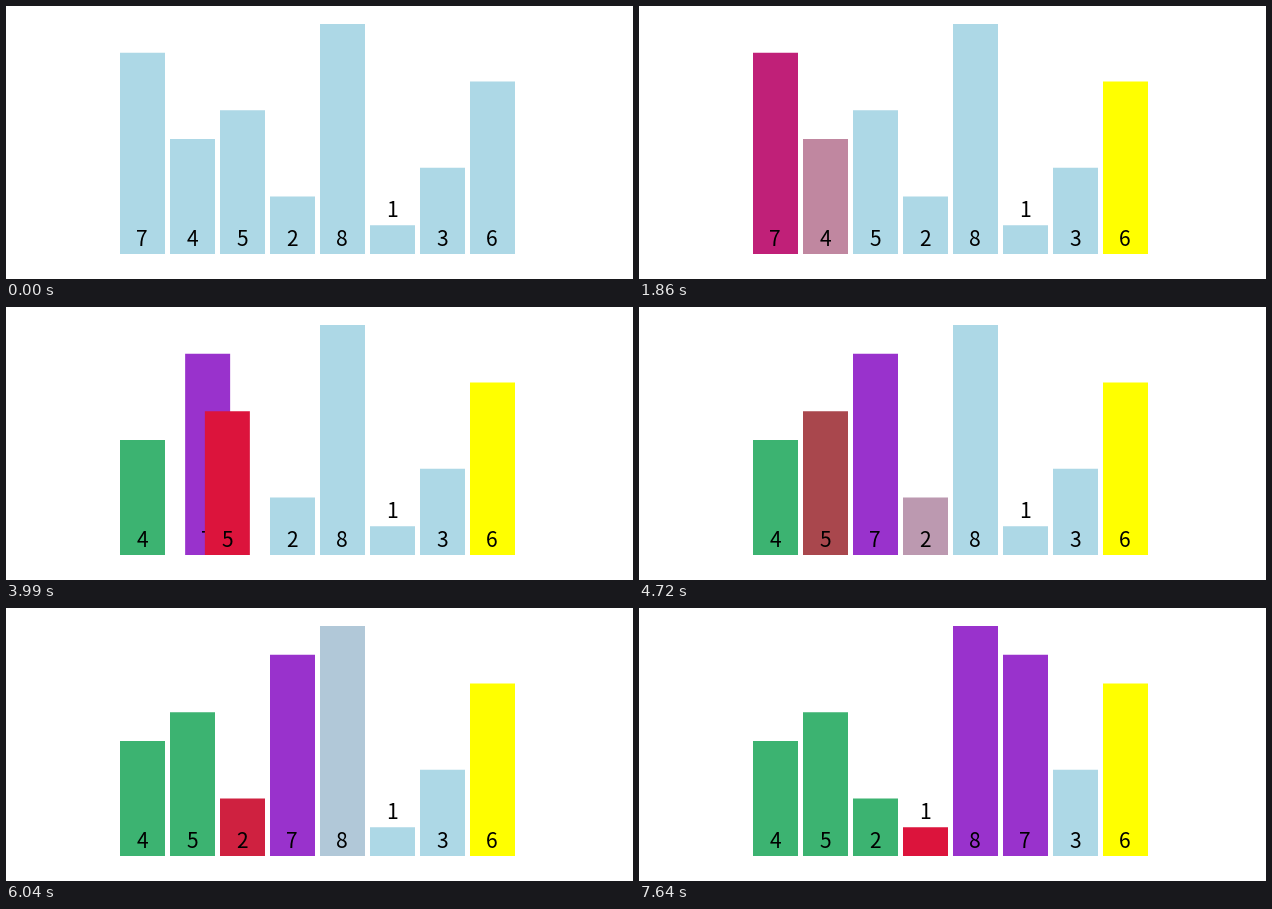
These frames come from a looping animation (627x273 px, 8000 ms). A matplotlib script:

```python
import matplotlib.pyplot as plt
from matplotlib.animation import FuncAnimation
from matplotlib.colors import to_rgb
from matplotlib.patches import Rectangle
import numpy as np

W, H, DPI = 627, 273, 64
LOOP, TICK = 8000, 20
LEFT, PITCH, BAR_W, BASE, UNIT = 114, 50, 45, 248, 28.75
VALUES = [7, 4, 5, 2, 8, 1, 3, 6]

# Each step of the sort starts at one of these moments and eases for FADE ms
STARTS = [420, 1110, 1738, 2445, 3148, 3870, 4608, 5280, 5969, 6691, 7330]
FADE = 260

IDLE, PIVOT, ACTIVE, LESS, MORE = (
    np.array(to_rgb(c))
    for c in ("lightblue", "yellow", "crimson", "mediumseagreen", "darkorchid")
)


def partition(values):
    """Yield (slots, colours) after each step of a quicksort partition."""
    order = list(values)
    colour = {v: IDLE for v in order}
    pivot, store = order[-1], 0

    def snap():
        return {v: i for i, v in enumerate(order)}, dict(colour)

    yield snap()
    colour[pivot] = PIVOT
    yield snap()
    for i in range(len(order) - 1):
        v = order[i]
        colour[v] = ACTIVE
        yield snap()
        if v < pivot:
            if store != i:
                order[store], order[i] = order[i], order[store]
                yield snap()
            store += 1
        colour[v] = LESS if v < pivot else MORE


def ease(t):
    t = min(max(t, 0), 1)
    return 4 * t**3 if t < 0.5 else 1 - 4 * (1 - t) ** 3


def mix(a, b, p):
    return a + (b - a) * p


STATES = list(partition(VALUES))

fig = plt.figure(figsize=(W / DPI, H / DPI), dpi=DPI, facecolor="white")
ax = fig.add_axes([0, 0, 1, 1])
ax.set(xlim=(0, W), ylim=(H, 0))
ax.axis("off")

bars, labels = {}, {}
for z, v in enumerate(VALUES):
    height = v * UNIT
    bars[v] = ax.add_patch(
        Rectangle((0, BASE - height), BAR_W, height, lw=0, snap=False, zorder=2 * z + 1)
    )
    # A label that does not fit inside a short bar sits above it
    foot = BASE if v > 1 else BASE - height
    labels[v] = ax.text(
        0, foot - 8, str(v), ha="center", va="baseline", color="black",
        family="Noto Sans CJK JP", fontsize=21 * 72 / DPI, zorder=2 * z + 2,
    )


def draw(frame):
    ms = frame * TICK
    step = max(sum(ms >= s for s in STARTS) - 1, 0)
    p = ease((ms - STARTS[step]) / FADE)
    (slot_a, col_a), (slot_b, col_b) = STATES[step : step + 2]
    for v in VALUES:
        x = LEFT + PITCH * mix(slot_a[v], slot_b[v], p)
        bars[v].set_x(x)
        bars[v].set_facecolor(mix(col_a[v], col_b[v], p))
        labels[v].set_x(x + BAR_W / 2 - 0.5)
    return [*bars.values(), *labels.values()]


anim = FuncAnimation(
    fig, draw, frames=LOOP // TICK, interval=TICK, repeat=True, repeat_delay=0
)
plt.show()
```
